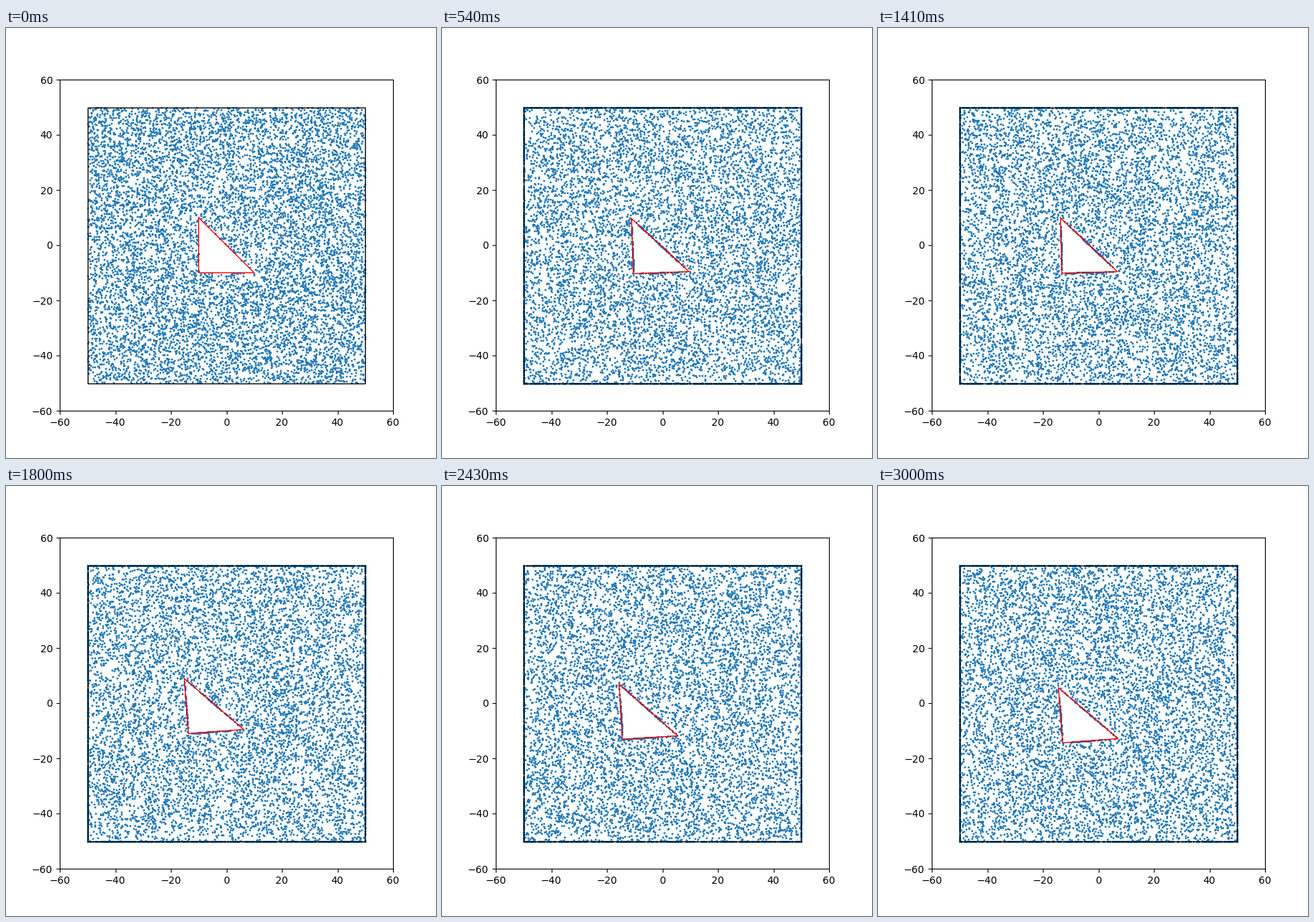
Recreate the animation shown at these times as a matplotlib script. Size 600x600 px, loop 3030 ms.

```python
import numpy as np
import matplotlib.pyplot as plt
from matplotlib.animation import FuncAnimation

FRAMES = 101
INTERVAL = 30
N = 10000
HALF = 50      # half side of the box
LEG = 20       # legs of the right triangle
STEP = 7.0     # standard deviation of one particle step

rng = np.random.default_rng(7)

# Path of the right-angled corner and tilt of the triangle over one loop
u = np.linspace(0, 1, FRAMES)
corner_x = np.interp(u, [0, 0.31, 0.47, 0.89, 1], [-10, -10.6, -13.2, -14.6, -12.7])
corner_y = -10 - 4.5 * u + 1.9 * np.sin(np.pi * u) ** 2
tilt = np.radians(5 * u + 1.5 * np.sin(2 * np.pi * u / 0.52))

# Slight tremble from the impacts
for path in (corner_x, corner_y):
    path[1:] += rng.normal(0, 0.08, FRAMES - 1)


def pose(i):
    c, s = np.cos(tilt[i]), np.sin(tilt[i])
    return np.array([corner_x[i], corner_y[i]]), np.array([[c, -s], [s, c]])


def triangle(i):
    origin, rot = pose(i)
    return np.array([(0, LEG), (0, 0), (LEG, 0), (0, LEG)]) @ rot.T + origin


def inside(local):
    return (local > 0).all(axis=1) & (local.sum(axis=1) < LEG)


def push_out(points, i):
    """Move particles inside the triangle to its nearest edge."""
    origin, rot = pose(i)
    local = (points - origin) @ rot
    hit = inside(local)
    p = local[hit]
    gap = (LEG - p.sum(axis=1)) / 2
    depth = np.column_stack([p, gap * np.sqrt(2)])
    edge = depth.argmin(axis=1)
    p[edge == 0, 0] = 0
    p[edge == 1, 1] = 0
    p[edge == 2] += gap[edge == 2, None]
    points[hit] = p @ rot.T + origin
    return points


def simulate():
    points = rng.uniform(-HALF, HALF, (N, 2))
    points = points[~inside(points - pose(0)[0])]
    history = [points]
    for i in range(1, FRAMES):
        moved = points + rng.normal(0, STEP, points.shape)
        points = push_out(np.clip(moved, -HALF, HALF), i)
        history.append(points)
    return history


history = simulate()

fig, ax = plt.subplots(figsize=(6, 6), dpi=100)
ax.set_xlim(-60, 60)
ax.set_ylim(-60, 60)
dots, = ax.plot([], [], "o", ms=1, color="C0", zorder=2)
ax.add_patch(plt.Rectangle((-HALF, -HALF), 2 * HALF, 2 * HALF,
                           fill=False, lw=1, zorder=3))
body, = ax.plot([], [], color="red", lw=1, zorder=3)


def update(i):
    dots.set_data(*history[i].T)
    body.set_data(*triangle(i).T)
    return dots, body


anim = FuncAnimation(fig, update, frames=FRAMES, interval=INTERVAL,
                     repeat=True, repeat_delay=0)
plt.show()
```
